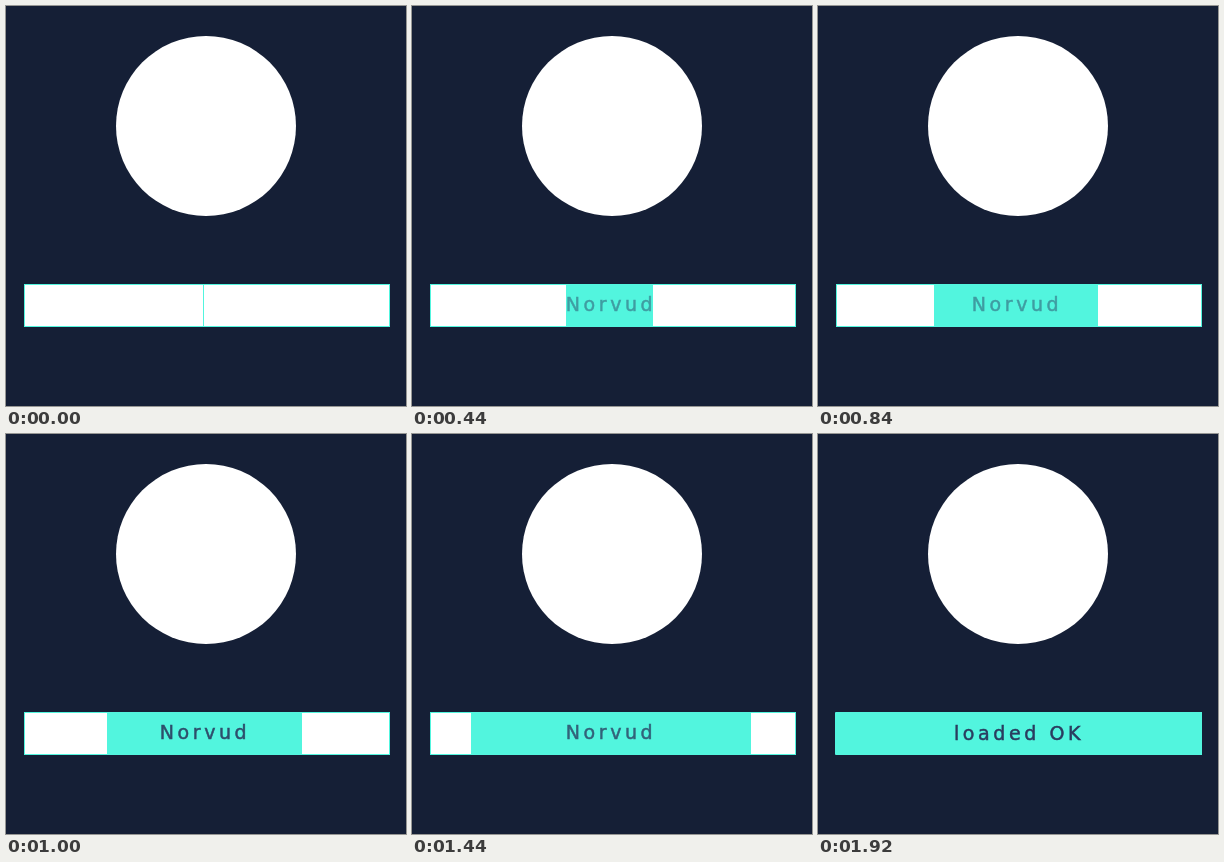
Animation of 400 by 400 pixels, one loop 2400 ms. Source, as an HTML page:

```html
<!DOCTYPE html>
<html lang="en">
<head>
<meta charset="utf-8">
<title>Loading bar</title>
<style>
  html, body { margin: 0; width: 100%; height: 100%; overflow: hidden; background: #151f36; }
  svg { display: block; width: 100vw; height: 100vh; }
  text {
    font: 19px "DejaVu Sans", sans-serif;
    letter-spacing: 3.6px;
    fill: #2a3c5f;
    stroke: #2a3c5f;
    stroke-width: .5px;
    text-anchor: middle;
  }
</style>
</head>
<body>
<svg viewBox="0 0 400 400">
  <clipPath id="clip"><rect id="window" y="279" height="41"/></clipPath>
  <circle cx="200" cy="120" r="90" fill="#fff"/>
  <rect x="18.5" y="278.5" width="365" height="42" fill="#fff" stroke="#52f5de"/>
  <rect id="fill" y="279" height="41" fill="#52f5de"/>
  <g clip-path="url(#clip)"><text id="label" x="199" y="305">Norvud</text></g>
  <g id="done">
    <rect x="17" y="278" width="367" height="43" rx="1" fill="#52f5de"/>
    <text x="201" y="306">loaded OK</text>
  </g>
</svg>
<script>
const LOOP = 2400, STEP = 40, DONE = 1920, BLINK = 400;
const get = id => document.getElementById(id);
const bars = [get('fill'), get('window')], label = get('label'), done = get('done');

function draw(t) {
  // Edges snap to whole pixels
  const left = Math.max(18, Math.round(196.5 - .0957 * t));
  const right = Math.min(384, Math.round(197.6 + .098 * t));
  for (const bar of bars) {
    bar.setAttribute('x', left);
    bar.setAttribute('width', right - left);
  }
  // Triangle-wave blink, dimmest at the start of each period
  const wave = 1 - Math.abs(t % BLINK / (BLINK / 2) - 1);
  label.setAttribute('opacity', .37 + .53 * wave);
  done.setAttribute('visibility', t >= DONE ? 'visible' : 'hidden');
}

const start = performance.now();
function tick() {
  const t = (performance.now() - start) % LOOP;
  draw(Math.floor(t / STEP) * STEP);
  requestAnimationFrame(tick);
}
tick();
</script>
</body>
</html>
```
